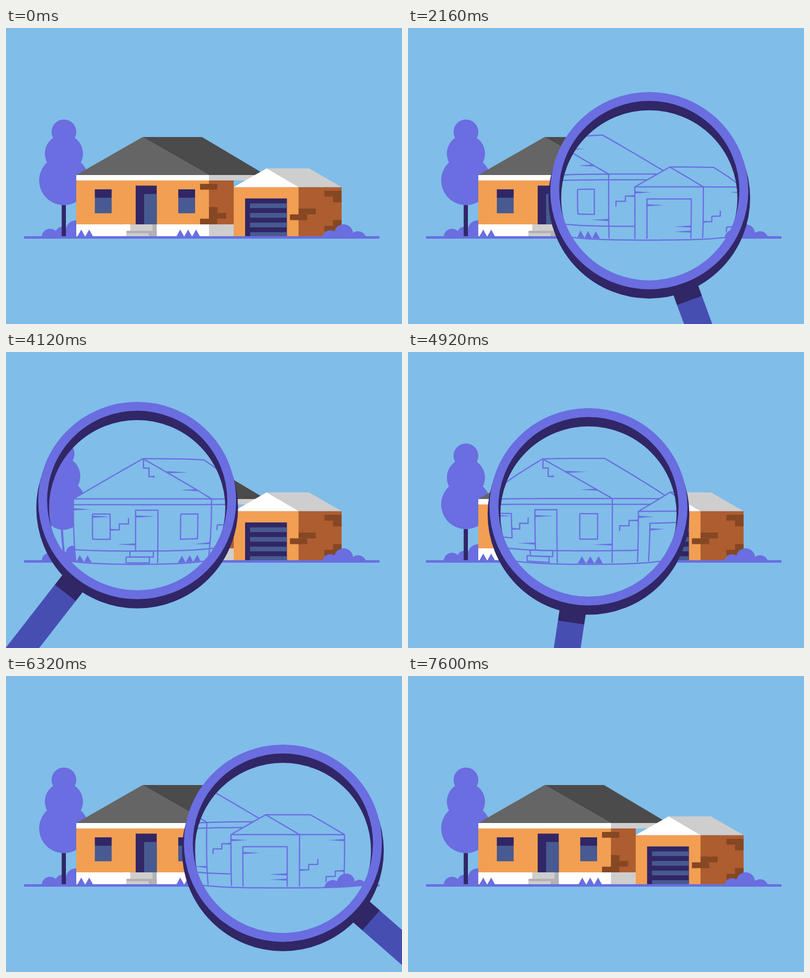
Recreate the animation shown at these times as an HTML page with a canvas. Size 800 by 600 pixels, loop 9 s.

```html
<!DOCTYPE html>
<html lang="en">
<head>
<meta charset="utf-8">
<title>House inspection</title>
<style>
  html, body { margin: 0; width: 100%; height: 100%; overflow: hidden; background: #80bde9; }
  canvas { display: block; width: 800px; height: 600px; }
</style>
</head>
<body>
<canvas id="stage" width="800" height="600"></canvas>
<script>
const ctx = document.getElementById('stage').getContext('2d');
const LOOP = 9000, STEP = 40, TAU = Math.PI * 2;
const SKY = '#80bde9', VIOLET = '#6a6ee0', NAVY = '#312666', HANDLE = '#474eb2';
const ORANGE = '#f29f53', RUST = '#ad5d30', BRICK = '#864723', BLUE = '#475a91';
const WHITE = '#fff', LIGHT = '#cecece', GREY = '#b2b2b2';

// Both buildings share one plan: a front wall, a side wall and a hipped roof.
const HOME = { left: 142, corner: 410, right: 525, apex: 276, back: 396, ridge: 221, eave: 298 };
const GARAGE = { left: 460, corner: 591, right: 678, apex: 526.5, back: 612, ridge: 284.5, eave: 322.5 };
const FLOOR = 422, GROUND = 424.5, TRIM = 309, BASE = 398;
const WINDOWS = [179.5, 348];

// ---- drawing helpers; with a lens set, every point is bulged ----
let lens = null;

function point(x, y) {
  if (!lens) return ctx.lineTo(x, y);
  const dx = x - lens.x, dy = y - lens.y, q = (dx * dx + dy * dy) / 180 ** 2;
  const m = 1 + .062 * Math.max(0, 1 - q * q);
  ctx.lineTo(lens.x + dx * m, lens.y + dy * m);
}
function trace(p) {
  ctx.beginPath();
  point(p[0], p[1]);
  for (let i = 2; i < p.length; i += 2) {
    const dx = p[i] - p[i - 2], dy = p[i + 1] - p[i - 1];
    const n = lens ? Math.ceil(Math.hypot(dx, dy) / 10) : 1;
    for (let k = 1; k <= n; k++) point(p[i - 2] + dx * k / n, p[i - 1] + dy * k / n);
  }
}
function fill(color, ...p) {
  trace([...p, p[0], p[1]]);
  ctx.fillStyle = color;
  ctx.fill();
}
function line(...p) {
  trace(p);
  ctx.stroke();
}
function pen(width, cap = 'butt') {
  ctx.strokeStyle = VIOLET;
  ctx.lineWidth = width;
  ctx.lineCap = cap;
  ctx.lineJoin = 'round';
}
const corners = (x, y, w, h) => [x, y, x + w, y, x + w, y + h, x, y + h];
const box = (color, ...r) => fill(color, ...corners(...r));
const frame = (x, y, w, h) => line(...corners(x, y, w, h), x, y);

// A disc that stops at the ground
function mound(x, y, r) {
  ctx.beginPath();
  for (let a = 0; a < TAU; a += TAU / 90) {
    point(x + r * Math.cos(a), Math.min(y + r * Math.sin(a), GROUND));
  }
  ctx.fillStyle = VIOLET;
  ctx.fill();
}

// ---- parts used by both pictures ----
function garden() {
  mound(117, 210.5, 25);
  mound(117, 254.5, 38.5);
  mound(117, 309, 50);
  mound(89, 424, 17);
  mound(113, 416, 13);
  mound(141, 410, 20);
}
function hedge() {
  mound(655, 426, 16);
  mound(682, 417, 19);
  mound(711, 429, 17);
}
function grass(x, count) {
  for (; count--; x += 16) fill(VIOLET, x - 8, 423, x, 408.5, x + 8, 423);
}
function allGrass() {
  grass(152, 2);
  grass(352, 3);
}
const frontRoof = b => [b.left, b.eave, b.apex, b.ridge, b.corner, b.eave];
const sideRoof = b => [b.apex, b.ridge, b.back, b.ridge, b.right, b.eave, b.corner, b.eave];

// ---- flat picture ----
function bricks(x, y, n) {
  box(BRICK, x, y, n * 17.4, 11.7);
}
function walls(b, top, bottom, front, side, right = b.right) {
  box(front, b.left, top, b.corner - b.left, bottom - top);
  box(side, b.corner, top, right - b.corner, bottom - top);
}

function drawHouse() {
  box(SKY, 0, 0, 800, 600);
  garden();
  box(NAVY, 112.5, 359, 8.5, 63);

  walls(HOME, TRIM, BASE, ORANGE, RUST, GARAGE.left);
  walls(HOME, BASE, FLOOR, WHITE, LIGHT, GARAGE.left);
  walls(HOME, HOME.eave, TRIM, WHITE, LIGHT);
  fill('#4b4b4b', ...sideRoof(HOME));
  fill('#656565', ...frontRoof(HOME));
  bricks(392, 316, 2);
  bricks(410, 363, 1);
  bricks(410, 374.7, 2);
  bricks(392, 386.4, 2);
  for (const x of WINDOWS) {
    box(NAVY, x, 327, 34, 17);
    box(BLUE, x, 344, 34, 31.5);
  }
  box(NAVY, 262, 319.5, 42.5, 78.5);
  box(BLUE, 279, 336.5, 25.5, 61.5);
  box(GREY, 251, BASE, 53.5, 24);
  box(GREY, 243.5, 411, 61, 11);
  box(LIGHT, 251, BASE, 45, 13);
  box(LIGHT, 243.5, 416, 44.5, 6);

  walls(GARAGE, GARAGE.eave, FLOOR, ORANGE, RUST);
  fill(LIGHT, ...sideRoof(GARAGE));
  fill(WHITE, ...frontRoof(GARAGE));
  bricks(591, 366, 2);
  bricks(573.6, 377.7, 2);
  bricks(643.2, 330, 2);
  bricks(660.6, 341.7, 1);
  bricks(660.6, 389.3, 1);
  bricks(643.2, 401, 2);
  box(NAVY, 483, 345.5, 84.5, 76.5);
  for (let y = 355.5; y < FLOOR; y += 19.5) box(BLUE, 493, y, 74.5, Math.min(9.5, FLOOR - y));

  allGrass();
  hedge();
  pen(5, 'round');
  line(38.5, GROUND, 752.5, GROUND);
}

// ---- line drawing seen through the glass ----
function tick(x, y, length) {
  fill(VIOLET, x, y - 2, x + length, y, x, y + 2);
}
// Two stair steps that start in a thick wedge
function crack(x, y, w, h) {
  line(x, y, x + w, y, x + w, y - h, x + 2 * w, y - h, x + 2 * w, y - 2 * h);
  tick(x, y, w);
}
function outline(b) {
  fill(SKY, b.left, FLOOR, ...frontRoof(b), b.corner, FLOOR);
  fill(SKY, ...sideRoof(b), b.corner, FLOOR, b.right, FLOOR, b.right, b.eave);
  pen(2.5);
  line(b.left, FLOOR, ...frontRoof(b), b.corner, FLOOR);
  line(...sideRoof(b).slice(0, 6));
  line(b.left, b.eave, b.right, b.eave);
}

function drawSketch() {
  garden();
  box(VIOLET, 114, 355, 5, 69);

  outline(HOME);
  line(HOME.left, TRIM, HOME.right, TRIM);
  line(HOME.left, BASE, HOME.right, BASE);
  for (const x of WINDOWS) frame(x, 327, 34, 48.5);
  line(262, BASE, 262, 319.5, 304.5, 319.5, 304.5, FLOOR);
  frame(251, BASE, 45, 12);
  frame(243.5, 410, 45, 11.5);
  crack(298, 255.5, -10.5, 16.5);
  crack(213.5, 357, 17.5, 11.3);
  crack(460, 340, -18, -10);
  tick(HOME.left, 318, 35);
  tick(179.5, 332, 34);
  tick(262, 331.5, 36);
  tick(262, 385, -35);
  tick(HOME.corner, 386, -36);
  tick(321, 247, 42);
  tick(380, 281, -32);
  allGrass();

  outline(GARAGE);
  line(GARAGE.right, GARAGE.eave, GARAGE.right, FLOOR);
  line(483, FLOOR, 483, 345.5, 567.5, 345.5, 567.5, FLOOR);
  crack(591, 390, 17.5, 10.5);
  crack(678, 392.5, -18, -10.5);
  tick(GARAGE.left, 333, 32);
  tick(483, 357.5, 32);
  tick(567.5, 398.5, -33);
  tick(567.5, 408.5, -33);
  tick(GARAGE.right, 333, -33);
  line(38, GROUND, 753, GROUND);
  hedge();
}

// ---- motion ----
// Cubic bezier easing with flat ends; x1 and x2 set how long each end lingers
function ease(t, from, to, x1 = 1 / 3, x2 = 2 / 3) {
  const u = Math.min(1, Math.max(0, (t - from) / (to - from)));
  let lo = 0, hi = 1, s = .5;
  for (let i = 0; i < 24; i++) {
    s = (lo + hi) / 2;
    const x = 3 * (1 - s) * s * ((1 - s) * x1 + s * x2) + s ** 3;
    if (x < u) lo = s; else hi = s;
  }
  return s * s * (3 - 2 * s);
}

function pose(t) {
  const enter = ease(t, 200, 1200, .33, .33);
  const swing = ease(t, 1314, 3331, .55, .6) - ease(t, 4110, 6540, .42, .33) * .978;
  const lift = ease(t, 6540, 6946), drop = ease(t, 6946, 7717);
  const leave = ease(t, 6540, 7600);
  const turn = 10 + 39 * enter + 78.8 * swing - 10 * ease(t, 4110, 6540, .42, .33) - 26 * leave;
  return {
    x: 568 - 303 * swing,
    y: 800 - 460 * enter - 39 * swing - 72 * lift + 568 * drop,
    angle: turn * Math.PI / 180
  };
}

// Two slanted bands cross the glass from left to right
function drawShine({ x, y }, t) {
  for (const start of [2538, 5032]) {
    if (t < start || t > start + 1400) continue;
    const edge = x - 250 + 690 * ease(t, start, start + 1400);
    const band = (a, b) => fill('rgba(190,240,250,.28)',
      edge + a + 114, y - 200, edge + b + 114, y - 200,
      edge + b - 114, y + 200, edge + a - 114, y + 200);
    band(-37, 0);
    band(-172, -67);
  }
}

function ring(color, x, y, outer, inner) {
  ctx.beginPath();
  ctx.arc(x, y, (outer + inner) / 2, 0, TAU);
  ctx.strokeStyle = color;
  ctx.lineWidth = outer - inner;
  ctx.stroke();
}

function drawLens(t) {
  const at = pose(t), low = at.y + 15;
  ctx.save();
  ctx.beginPath();
  ctx.arc(at.x, low, 179, 0, TAU);
  ctx.clip();
  box(SKY, 0, 0, 800, 600);
  lens = at;
  drawSketch();
  lens = null;
  drawShine(at, t);
  ctx.restore();

  ctx.save();
  ctx.translate(at.x, at.y);
  ctx.rotate(at.angle);
  box(NAVY, 196, -26.8, 42, 53.6);
  box(HANDLE, 237, -26.8, 400, 53.6);
  ctx.restore();

  ring(NAVY, at.x, low, 203.8, 178);
  ring(VIOLET, at.x, at.y, 200, 182);
}

let begin;
function play(now) {
  begin ??= now;
  const t = Math.floor(Math.max(0, now - begin) % LOOP / STEP) * STEP;
  drawHouse();
  if (t >= 240 && t < 7600) drawLens(t);
  requestAnimationFrame(play);
}
drawHouse();
requestAnimationFrame(play);
</script>
</body>
</html>
```
